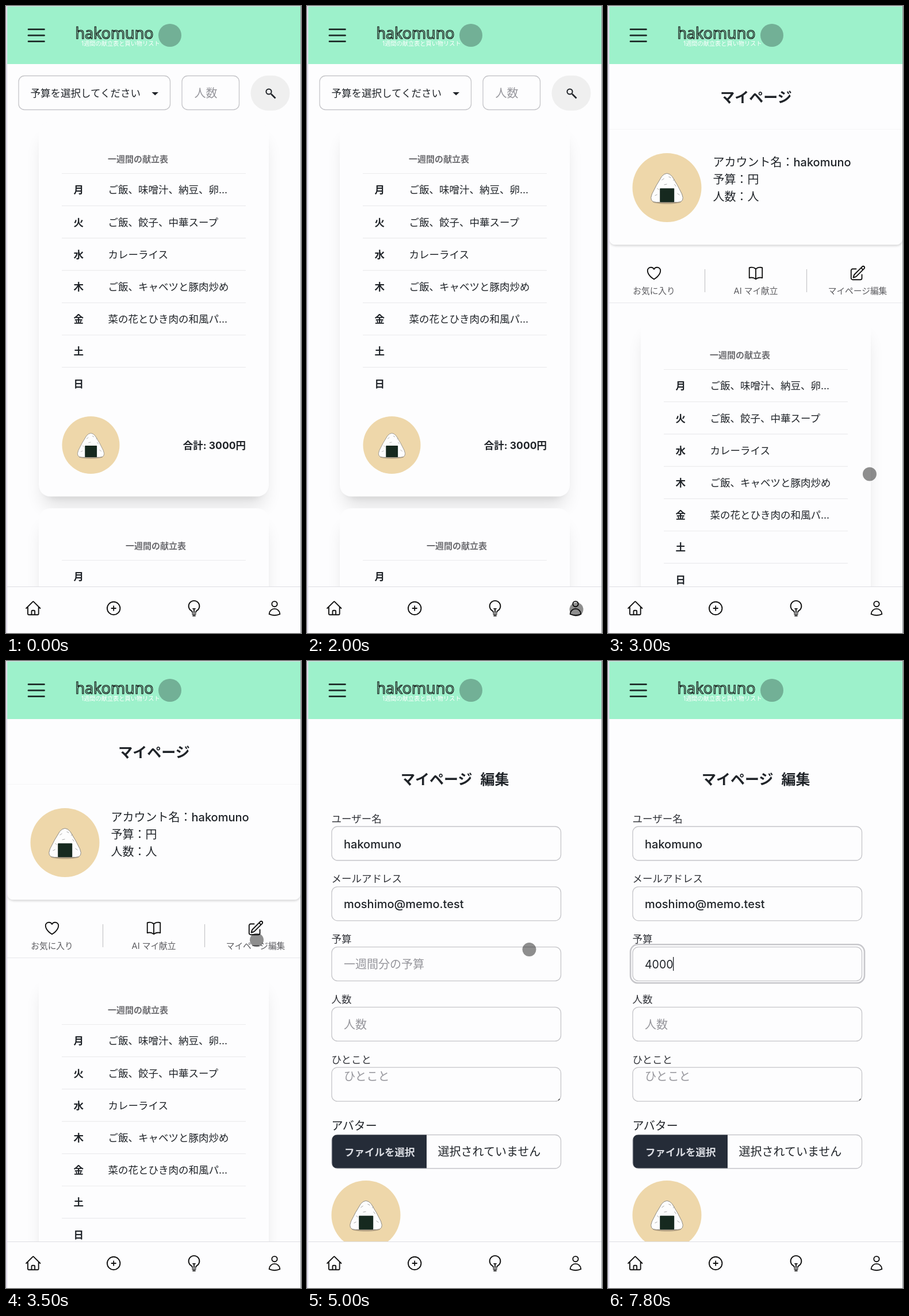
An HTML page for the animation above (8 s loop, 513 px wide and 1091 px high).

```html
<!DOCTYPE html>
<html lang="ja">
<head>
<meta charset="utf-8">
<title>献立アプリ</title>
<style>
  html, body { margin: 0; width: 100%; height: 100%; overflow: hidden; background: #fdfdfe; }
  svg { display: block; width: 513px; height: 1091px; }
  text { font-family: Inter, "Noto Sans CJK JP", "Noto Sans CJK", sans-serif; white-space: pre; }
  .icon { fill: none; stroke: #111; stroke-width: 1.5; stroke-linecap: round; stroke-linejoin: round; }
  .field { fill: #fdfdfe; stroke: #c5c5c9; stroke-width: 1.3; }
  .wide { filter: blur(15px); opacity: .1; }
  .near { filter: blur(6px); opacity: .1; }
  .wordmark { font-family: "Open Sans", sans-serif; font-size: 27px; fill: #9df1cb; stroke: #111; stroke-width: 1.2; }
</style>
</head>
<body>
<svg id="stage" viewBox="0 0 513 1091"></svg>
<script>
const INK = '#1f2328', HINT = '#96969c', MUTED = '#6c6c70', LABEL = '#303238', PAPER = '#fdfdfe';
const APP = 'hakomuno';

const icons = {
  home: 'M2.25 12l8.954-8.955c.44-.439 1.152-.439 1.591 0L21.75 12M4.5 9.75v10.125c0 .621.504 1.125 1.125 1.125H9.75v-4.875c0-.621.504-1.125 1.125-1.125h2.25c.621 0 1.125.504 1.125 1.125V21h4.125c.621 0 1.125-.504 1.125-1.125V9.75M8.25 21h8.25',
  plus: 'M12 9v6m3-3H9m12 0a9 9 0 11-18 0 9 9 0 0118 0z',
  bulb: 'M12 18v-5.25m0 0a6.01 6.01 0 001.5-.189m-1.5.189a6.01 6.01 0 01-1.5-.189m3.75 7.478a12.06 12.06 0 01-4.5 0m3.75 2.383a14.406 14.406 0 01-3 0M14.25 18v-.192c0-.983.658-1.823 1.508-2.316a7.5 7.5 0 10-7.517 0c.85.493 1.509 1.333 1.509 2.316V18',
  user: 'M15.75 6a3.75 3.75 0 11-7.5 0 3.75 3.75 0 017.5 0zM4.501 20.118a7.5 7.5 0 0114.998 0A17.933 17.933 0 0112 21.75c-2.676 0-5.216-.584-7.499-1.632z',
  heart: 'M21 8.25c0-2.485-2.099-4.5-4.688-4.5-1.935 0-3.597 1.126-4.312 2.733-.715-1.607-2.377-2.733-4.313-2.733C5.1 3.75 3 5.765 3 8.25c0 7.22 9 12 9 12s9-4.78 9-12z',
  book: 'M12 6.042A8.967 8.967 0 006 3.75c-1.052 0-2.062.18-3 .512v14.25A8.987 8.987 0 016 18c2.305 0 4.408.867 6 2.292m0-14.25a8.966 8.966 0 016-2.292c1.052 0 2.062.18 3 .512v14.25A8.987 8.987 0 0018 18a8.967 8.967 0 00-6 2.292m0-14.25v14.25',
  pencil: 'M16.862 4.487l1.687-1.688a1.875 1.875 0 112.652 2.652L10.582 16.07a4.5 4.5 0 01-1.897 1.13L6 18l.8-2.685a4.5 4.5 0 011.13-1.897l8.932-8.931zm0 0L19.5 7.125M18 14v4.75A2.25 2.25 0 0115.75 21H5.25A2.25 2.25 0 013 18.75V8.25A2.25 2.25 0 015.25 6H10'
};

// Text is placed by the vertical middle of its glyphs.
const text = (x, mid, size, str, { fill = INK, weight = 400, anchor = 'start', id = '' } = {}) =>
  `<text id="${id}" x="${x}" y="${mid + size * .38}" font-size="${size}" font-weight="${weight}" fill="${fill}" text-anchor="${anchor}">${str}</text>`;
const rect = (x, y, w, h, r, attrs) =>
  `<rect x="${x}" y="${y}" width="${w}" height="${h}" rx="${r}" ${attrs}/>`;
const line = (x1, y1, x2, y2, color, width = 1, cap = 'butt') =>
  `<path d="M${x1} ${y1}L${x2} ${y2}" stroke="${color}" stroke-width="${width}" stroke-linecap="${cap}"/>`;
const icon = (name, x, y) =>
  `<path class="icon" transform="translate(${x - 15} ${y - 15}) scale(1.25)" d="${icons[name]}"/>`;

const avatar = (x, y, r) => `<g transform="translate(${x} ${y}) scale(${r / 60})">
  <circle r="60" fill="#eed7aa"/>
  <ellipse cy="24.5" rx="25" ry="4" fill="#b5a283"/>
  <path d="M-9 -19.5Q0 -30 9 -19.5Q19 -4 26 11Q32 25.5 18 25.5H-18Q-32 25.5 -26 11Q-19 -4 -9 -19.5Z" fill="#fdfdfd" stroke="#8f8a80"/>
  <path d="M-9 -13l4 -3M3 -19l4 2M-17 1l3 3M-5 -5l5 -1M13 -6l3 4M-21 14l4 -2M18 10l4 3M11 -12l2 -3" stroke="#aaa" fill="none"/>
  ${rect(-12.3, 1.2, 25, 24, 1, 'fill="#16291f"')}
</g>`;

const menu = [
  ['月', 'ご飯、味噌汁、納豆、卵...'], ['火', 'ご飯、餃子、中華スープ'], ['水', 'カレーライス'],
  ['木', 'ご飯、キャベツと豚肉炒め'], ['金', '菜の花とひき肉の和風パ...'], ['土', ''], ['日', '']
];

function card(top, headX, dishes = true) {
  const rows = menu.map(([day, dish], i) => {
    const y = top + 90.5 + i * 56.2;
    return line(97, y, 417, y, '#ebebed', 1.2) +
      text(117.5, y + 28.2, 17.5, day, { weight: 700 }) +
      (dishes ? text(177.5, y + 28.2, 17.5, dish) : '');
  }).join('');
  return rect(63, top + 31, 388, 640, 20, 'class="wide"') +
    rect(65, top + 18, 384, 636, 20, 'class="near"') +
    rect(57, top, 400, 652.5, 20, `fill="${PAPER}"`) +
    text(headX, top + 65, 15, '一週間の献立表', { fill: MUTED, weight: 700 }) + rows +
    avatar(147.5, top + 563, 50) +
    text(417, top + 563, 17.5, '合計: 3000円', { weight: 700, anchor: 'end' });
}

const homePage = card(201, 177) + card(874, 208, false) +
  rect(22, 121.5, 263.5, 59, 10, 'class="field"') +
  text(42.5, 151, 17.5, '予算を選択してください') +
  `<path d="M253.5 150h11.5l-5.75 5.5z" fill="${INK}"/>` +
  rect(306, 121.5, 99.5, 59, 10, 'class="field"') +
  text(327.5, 151, 20, '人数', { fill: HINT }) +
  rect(425.5, 121, 68, 61, 30.5, 'fill="#efefef"') +
  `<circle cx="457" cy="149" r="4.6" fill="none" stroke="${INK}" stroke-width="2"/>` +
  line(461, 153, 468.5, 160.5, INK, 2.7);

const tabs = [['heart', 80, 'お気に入り'], ['book', 257, 'AI マイ献立'], ['pencil', 434, 'マイページ編集']];
const myPage = line(2, 214.5, 512, 214.5, '#f5f5f7') +
  rect(3, 220, 509, 197, 10, 'class="wide" style="filter:blur(2px);opacity:.2"') +
  rect(2, 215, 510, 200.5, 10, `fill="${PAPER}"`) +
  text(257.5, 158.5, 25, 'マイページ', { weight: 700, anchor: 'middle' }) +
  avatar(102.5, 316, 60) +
  text(182.5, 271, 20, `アカウント名：<tspan font-weight="500">${APP}</tspan>`) +
  text(182.5, 301, 20, '予算：円') + text(182.5, 331, 20, '人数：人') +
  tabs.map(([name, x, label]) => icon(name, x, 465) +
    text(x, 495.5, 14.7, label, { fill: '#5c5c60', anchor: 'middle' })).join('') +
  line(168.5, 458, 168.5, 498, '#c8c8cb', 1.3) + line(345.5, 458, 345.5, 498, '#c8c8cb', 1.3) +
  line(2, 516.5, 512, 516.5, '#e7e7ea', 1.2) +
  card(542, 177);

const fields = [
  ['ユーザー名', APP, INK], ['メールアドレス', 'moshimo@memo.test', INK], ['予算', '一週間分の予算', HINT, 'budget'],
  ['人数', '人数', HINT], ['ひとこと', 'ひとこと', HINT]
];
const editPage = text(163, 205, 25, 'マイページ', { weight: 700 }) + text(301.5, 205, 25, '編集', { weight: 700 }) +
  rect(39, 493.3, 407, 67, 13, 'id="ring" fill="none" stroke="#c7c7cb" stroke-width="2.6"') +
  fields.map(([label, value, fill, id], i) => {
    const y = 288 + i * 104.8, mid = i === 4 ? y + 15.5 : y + 30;
    return text(42.5, y - 14, 17.5, label, { fill: LABEL }) +
      rect(43, y, 398.5, 59, 10, 'class="field"') +
      text(64, mid, 20, value, { fill, id, weight: fill === INK ? 500 : 400 });
  }).join('') +
  line(437, 764.5, 439.5, 762, '#444', 1.3) +
  text(42.5, 808.5, 20, 'アバター') +
  rect(43, 824.5, 398.5, 58.5, 10, 'class="field"') +
  '<path d="M208 824.5H53q-9.5 0-9.5 9.5v39q0 9.5 9.5 9.5h155z" fill="#252c38"/>' +
  text(65, 854, 17.5, 'ファイルを選択', { weight: 700, fill: '#dcdee4' }) +
  text(227.5, 853, 20, '選択されていません') +
  avatar(102.5, 964, 60) +
  rect(63.5, 515, 1.3, 24, 0, `id="caret" fill="${INK}"`);

const header = rect(0, 0, 513, 101, 0, 'fill="#9df1cb"') +
  [40.7, 51.2, 61.7].map(y => line(39, y, 66.5, y, '#1d2b28', 2.7, 'round')).join('') +
  '<circle cx="285" cy="51" r="20" fill="#72b096"/>' +
  `<text class="wordmark" x="188.5" y="56.5" text-anchor="middle">${APP}</text>` +
  text(131, 65.3, 10.2, '1週間の献立表と買い物リスト', { fill: '#fff' });

const nav = rect(0, 1010, 513, 81, 0, `fill="${PAPER}"`) + line(0, 1010.5, 513, 1010.5, '#dedee3', 1.2) +
  icon('home', 47.3, 1048) + icon('plus', 187.2, 1048) + icon('bulb', 327, 1048) + icon('user', 467, 1048);

const edges = rect(0, 0, 2.2, 1091, 0, 'fill="#e2ddec"') + rect(0, 0, 513, 1, 0, 'fill="#d9dfe6"') +
  rect(512, 0, 1, 1091, 0, 'fill="#929599"');

const $ = id => document.getElementById(id);
$('stage').innerHTML = rect(0, 0, 513, 1091, 0, `fill="${PAPER}"`) +
  [homePage, myPage, editPage].map((page, i) => `<g id="page${i}">${page}</g>`).join('') +
  header + nav + edges + '<circle id="dot" r="12" fill="#000" fill-opacity=".44"/>';

// Pointer stops: time, x, y
const path = [
  [500, 512, 790], [800, 452, 880], [1000, 452, 880], [1700, 468, 1048.5], [1900, 468, 1048.5],
  [2000, 468.5, 1050], [2600, 468.5, 1050], [3500, 436, 485.5], [4700, 436, 485.5], [5500, 279.5, 538], [6800, 279.5, 538]
];
const typing = [[6800, '4'], [7300, '40'], [7500, '400'], [7800, '4000']];

function pointerAt(t) {
  const i = path.findIndex(([end]) => t < end);
  if (i < 1) return null;
  const [t0, x0, y0] = path[i - 1], [t1, x1, y1] = path[i];
  const u = (t - t0) / (t1 - t0), e = u * u * (3 - 2 * u);
  return [x0 + (x1 - x0) * e, y0 + (y1 - y0) * e];
}

const show = (el, on) => el.setAttribute('visibility', on ? 'visible' : 'hidden');

function draw(time) {
  const t = Math.floor(time / 100) * 100;
  const page = t < 2200 ? 0 : t < 4300 ? 1 : 2;
  for (let i = 0; i < 3; i++) $('page' + i).style.display = i === page ? '' : 'none';

  const pos = pointerAt(t);
  show($('dot'), pos);
  if (pos) $('dot').setAttribute('transform', `translate(${pos})`);

  const focused = t >= 5500;
  show($('ring'), focused);
  show($('caret'), focused);

  const typed = typing.filter(([at]) => t >= at).pop();
  const budget = $('budget');
  budget.textContent = typed ? typed[1] : '一週間分の予算';
  budget.setAttribute('fill', typed ? INK : HINT);
  budget.setAttribute('font-size', typed ? 19.5 : 20);
  $('caret').setAttribute('x', 63.5 + (typed ? budget.getComputedTextLength() : 0));
}

const start = performance.now();
function tick() {
  draw((performance.now() - start) % 8000);
  requestAnimationFrame(tick);
}
tick();
</script>
</body>
</html>
```
